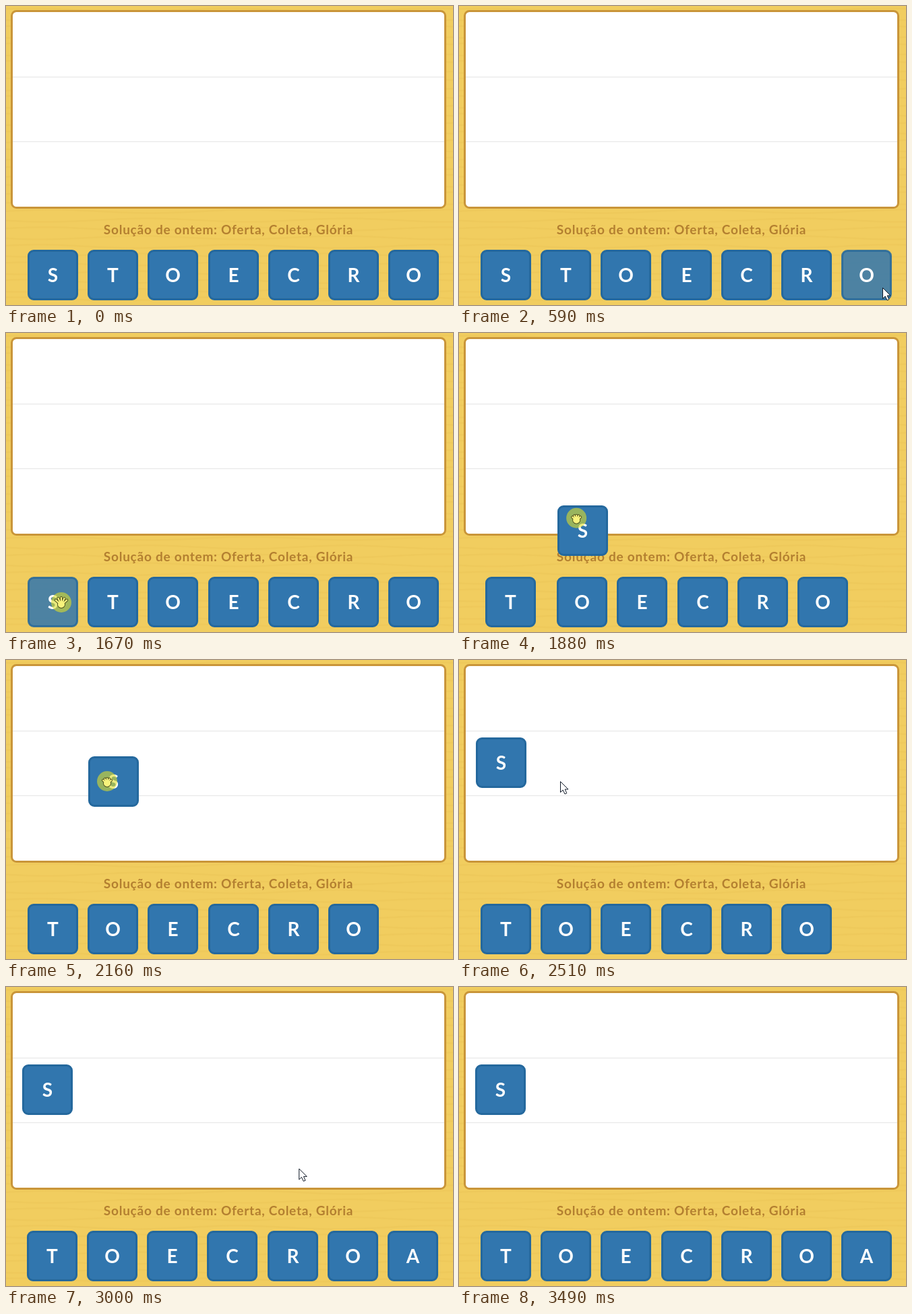
An HTML page with a canvas for the animation above (4150 ms loop, 663 px wide and 444 px high).

```html
<!DOCTYPE html>
<html lang="pt">
<head>
<meta charset="utf-8">
<title>Jogo de letras</title>
<style>
  html, body { margin: 0; width: 100%; height: 100%; overflow: hidden; background: #f1cd5f; }
  canvas { display: block; }
</style>
</head>
<body>
<canvas id="stage" width="663" height="444"></canvas>
<script>
const ctx = document.getElementById('stage').getContext('2d');
const LOOP = 4150, TILE = 75, PITCH = 89.2;
const TRAY = { x: 32, y: 362 }, SLOT = { x: 24, y: 115 };

// Moments of the story, counted in pointer steps of about 70 ms.
const PRESS = 13, LIFT = 17, RELEASE = 25, REFILL = 32, GONE = 42;
const FLIP_STEPS = 300 / 70;

// Each leg is an eased quadratic curve.
const approach = { start: 0, steps: 9, from: [628, 418], bend: [200, 165], to: [54, 403] };
const carry = { start: 16, steps: 7, from: [82, 400], bend: [253, 209], to: [150, 180] };
const leave = { start: 28.5, steps: 14.5, from: [150, 180], bend: [553, 290], to: [640, 380] };
const carriedTile = { ...carry, from: [32, 362], bend: [241, 211], to: [122, 143] };

const arrow = new Path2D('M.5 .5V16.5L4.2 13 7 19 9.8 17.8 7.2 12H12Z');

const clamp01 = v => Math.min(1, Math.max(0, v));
const smooth = p => p * p * (3 - 2 * p);
const remaining = (step, start) => (1 - clamp01((step - start) / FLIP_STEPS)) ** 3;

function along({ start, steps, from, bend, to }, step) {
  const u = smooth(clamp01((step - start) / steps)), v = 1 - u;
  return from.map((a, i) => v * v * a + 2 * u * v * bend[i] + u * u * to[i]);
}

function pointerAt(step) {
  if (step < 0 || step >= GONE) return null;
  const leg = [leave, carry, approach].find(({ start }) => step >= start);
  return along(leg, step);
}

function stepAt(t) {
  const sinceDrag = t - 1660;
  return carry.start + Math.floor(sinceDrag / (sinceDrag < 0 ? 67.5 : 70));
}

function box(x, y, w, h, radius, fill, stroke) {
  const line = 3;
  ctx.beginPath();
  ctx.roundRect(x + line / 2, y + line / 2, w - line, h - line, radius);
  ctx.fillStyle = fill;
  ctx.fill();
  ctx.lineWidth = line;
  ctx.strokeStyle = stroke;
  ctx.stroke();
}

function label(text, x, y, size, color, spacing = 0) {
  ctx.font = `700 ${size}px Lato, sans-serif`;
  ctx.letterSpacing = spacing + 'px';
  ctx.textAlign = 'center';
  ctx.fillStyle = color;
  ctx.fillText(text, x, y);
}

function drawBoard() {
  ctx.fillStyle = '#f1cd5f';
  ctx.fillRect(0, 0, 663, 444);
  ctx.strokeStyle = 'rgba(222, 178, 70, .16)';
  ctx.lineWidth = 2.5;
  for (let y = 6; y < 444; y += 13) {
    ctx.beginPath();
    for (let x = 0; x <= 670; x += 10) ctx.lineTo(x, y + 2.5 * Math.sin(x / 47 + y * 1.7));
    ctx.stroke();
  }
  box(7, 6, 646, 295, 7, '#fff', '#c99539');
  ctx.fillStyle = '#e5e5e5';
  for (const y of [105, 201]) ctx.fillRect(10, y, 640, 1);
  label('Solução de ontem: Oferta, Coleta, Glória', 330, 339, 19, '#b37f30', 0.75);
}

function drawTile(letter, left, top, pointer) {
  const x = Math.round(left), y = Math.round(top);
  const inside = (p, edge) => p >= edge && p < edge + TILE;
  const hovered = pointer && inside(pointer[0], x) && inside(pointer[1], y);
  ctx.globalAlpha = hovered ? 0.85 : 1;
  box(x, y, TILE, TILE, 7.5, '#3176ae', '#24689d');
  ctx.globalAlpha = 1;
  label(letter, x + TILE / 2, y + 48, 28, '#fff');
}

function drawTray(step, pointer) {
  const lifted = step >= LIFT, refilled = step >= REFILL;
  const slide = refilled ? -PITCH / 2 * remaining(step, REFILL) : 0;
  if (!lifted) drawTile('S', TRAY.x, TRAY.y, pointer);
  [...(refilled ? 'TOECROA' : 'TOECRO')].forEach((letter, i) => {
    // The first tile gives way a little before the rest.
    const shift = PITCH * remaining(step, LIFT + (i ? 0.48 : -0.43));
    drawTile(letter, TRAY.x + i * PITCH + shift + slide, TRAY.y, lifted ? null : pointer);
  });
}

function drawCarriedTile(step) {
  if (step < LIFT) return;
  const [x, y] = along(carriedTile, step), away = remaining(step, RELEASE - 0.5);
  drawTile('S', SLOT.x + (x - SLOT.x) * away, SLOT.y + (y - SLOT.y) * away);
}

function drawHand(reach, fill, outline) {
  ctx.beginPath();
  ctx.arc(0, 3, 4, 0, 2 * Math.PI);
  for (let finger = -2; finger <= 2; finger++) {
    const angle = finger * 0.42;
    ctx.moveTo(0, 4);
    ctx.lineTo(Math.sin(angle) * reach, 4 - Math.cos(angle) * reach);
  }
  ctx.lineCap = ctx.lineJoin = 'round';
  for (const [width, color] of [[4, outline], [2.2, fill]]) {
    ctx.lineWidth = width;
    ctx.strokeStyle = ctx.fillStyle = color;
    ctx.stroke();
    ctx.fill();
  }
}

function drawArrow() {
  ctx.lineWidth = 1;
  ctx.fillStyle = '#fff';
  ctx.strokeStyle = '#111a28';
  ctx.fill(arrow);
  ctx.stroke(arrow);
}

function drawPointer(step, [x, y]) {
  const pressed = step >= PRESS && step < RELEASE;
  ctx.save();
  ctx.translate(x, y);
  if (pressed) {
    ctx.beginPath();
    ctx.arc(0, 0, 15, 0, 2 * Math.PI);
    ctx.fillStyle = 'rgba(222, 222, 40, .6)';
    ctx.fill();
  }
  if (step < approach.steps - 1 || step > RELEASE) drawArrow();
  else drawHand(step < LIFT ? 11 : 8, pressed ? '#f8f37c' : '#fff', pressed ? '#4a4d1c' : '#111a28');
  ctx.restore();
}

function render(time) {
  const step = stepAt(time % LOOP), pointer = pointerAt(step);
  drawBoard();
  drawTray(step, pointer);
  drawCarriedTile(step);
  if (pointer) drawPointer(step, pointer);
}

let start;
function tick(now) {
  start ??= now;
  render(now - start);
  requestAnimationFrame(tick);
}
requestAnimationFrame(tick);
</script>
</body>
</html>
```
